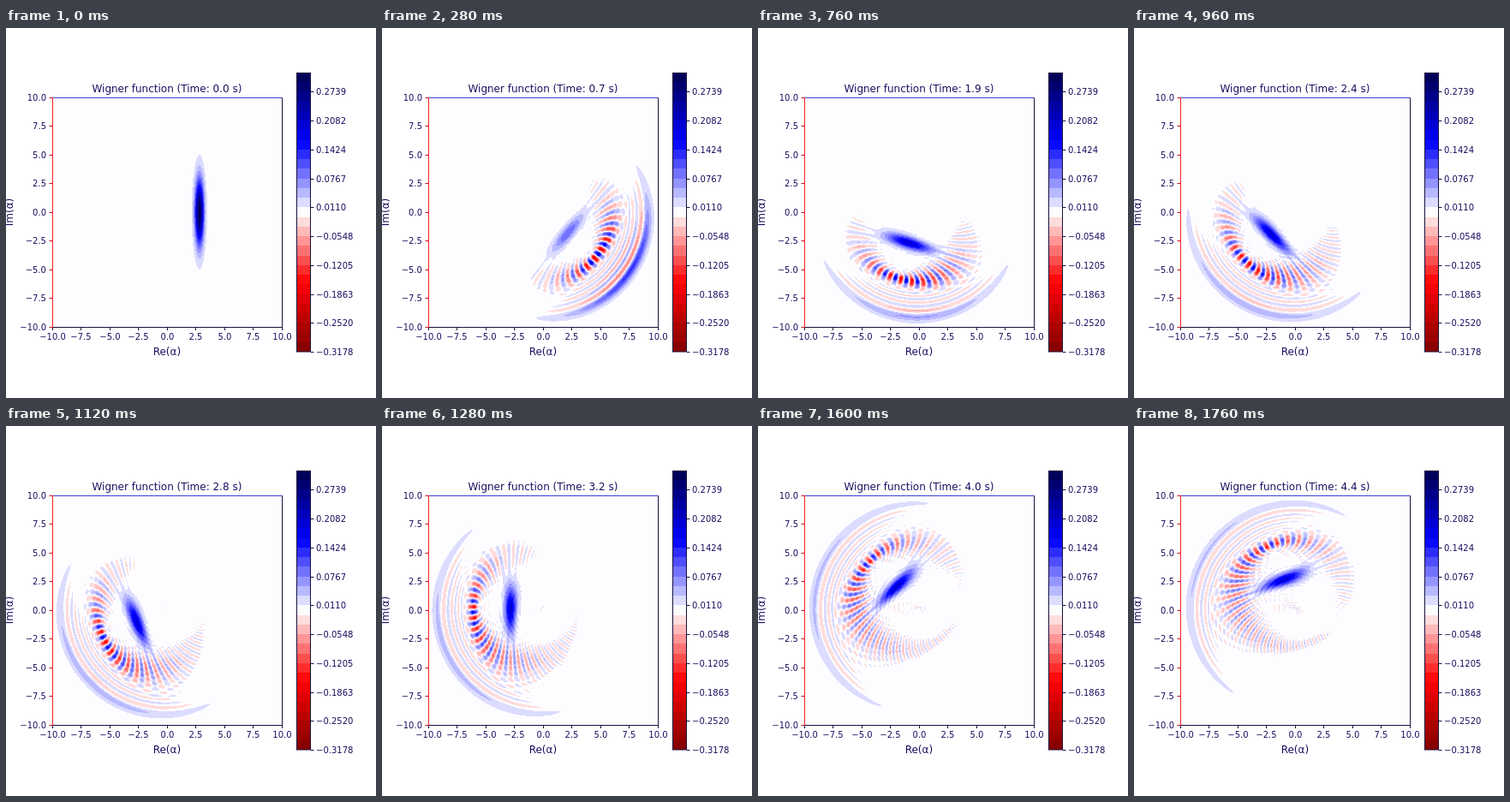
Write an HTML page with a canvas that moves like this. It is 432 px wide and 432 px high and loops after 1800 ms.

```html
<!DOCTYPE html>
<html lang="en">
<head>
<meta charset="utf-8">
<title>Wigner function</title>
<style>
  html, body { margin: 0; width: 100%; height: 100%; overflow: hidden; background: #fff; }
  canvas { position: absolute; left: 54px; top: 81px; }
  svg { position: absolute; left: 0; top: 0; }
  text { font: 10px "DejaVu Sans", sans-serif; fill: #1a1060; }
  .big { font-size: 12px; text-anchor: middle; }
  .end { text-anchor: end; }
  .mid { text-anchor: middle; }
  line { stroke: #181040; }
</style>
</head>
<body>
<canvas id="field" width="268" height="268"></canvas>
<svg id="chart" width="432" height="432" viewBox="0 0 432 432">
  <text id="title" class="big" x="187.9" y="75"></text>
  <text class="big" x="187.9" y="381.5">Re(α)</text>
  <text class="big" transform="translate(8 215) rotate(-90)">Im(α)</text>
</svg>
<script>
const FRAME_MS = 40, FRAMES = 45;
const SIDE = 267.9, LEFT = 54, TOP = 81;
const BINS = 29, PEAK = 0.31776;
const LEVELS = 60;             // Fock states kept
const H = 0.125;               // grid step in phase space
const M = 201, GRID = 161, PAD = 20;

const chart = document.getElementById('chart');
const title = document.getElementById('title');
const ctx = document.getElementById('field').getContext('2d');

// Colours: dark red - red - white - blue - dark blue
function binColor(i) {
  if (i === (BINS - 1) / 2) return [253, 253, 255];
  const v = 1 - (i + 0.5) / BINS;
  let c;
  if (v < 0.25) c = [0, 0, 0.3 + 2.8 * v];
  else if (v < 0.5) c = [4 * v - 1, 4 * v - 1, 1];
  else if (v < 0.75) c = [1, 3 - 4 * v, 3 - 4 * v];
  else c = [1 - 2 * (v - 0.75), 0, 0];
  return c.map(q => Math.round(q * 255));
}
const colors = Array.from({ length: BINS }, (_, i) => binColor(i));
const packed = Uint32Array.from(colors, ([r, g, b]) => (255 << 24 | b << 16 | g << 8 | r) >>> 0);

// Axes and colour bar
function add(tag, attrs, label) {
  const el = document.createElementNS('http://www.w3.org/2000/svg', tag);
  for (const k in attrs) el.setAttribute(k, attrs[k]);
  if (label) el.textContent = label;
  chart.appendChild(el);
}
const line = (x1, y1, x2, y2, stroke = '#181040') =>
  add('line', { x1, y1, x2, y2, style: `stroke:${stroke}` });
const signed = (v, digits) => v.toFixed(digits).replace('-', '−');

function drawChart() {
  const right = 322.5, bottom = 349.5;
  for (let i = 0; i < 9; i++) {
    const v = -10 + 2.5 * i;
    const x = Math.round(LEFT + i * SIDE / 8) + 0.5;
    const y = Math.round(TOP + SIDE - i * SIDE / 8) + 0.5;
    line(x, 350, x, 353);
    line(50.5, y, 54, y, '#d01020');
    add('text', { x, y: 363.5, class: 'mid' }, signed(v, 1));
    add('text', { x: 47, y: y + 3.4, class: 'end' }, signed(v, 1));
  }
  line(LEFT, bottom, 323, bottom);
  line(right, TOP, right, 350);
  line(LEFT, 81.5, 323, 81.5, '#4040d8');
  line(54.5, TOP, 54.5, 350, '#f02020');

  const barX = 339, barW = 16, barTop = 52, barH = 326, step = barH / BINS;
  colors.forEach((c, i) => add('rect', {
    x: barX, y: barTop + barH - (i + 1) * step, width: barW, height: step,
    fill: `rgb(${c})`, 'shape-rendering': 'crispEdges'
  }));
  add('rect', { x: 339.5, y: 52.5, width: barW, height: barH - 0.5, fill: 'none', stroke: '#181040' });
  for (let i = 0; i < BINS; i += 3) {
    const y = barTop + barH - i * step;
    line(356, Math.round(y) + 0.5, 359.5, Math.round(y) + 0.5);
    add('text', { x: 362, y: y + 4 }, signed(-PEAK + i * 2 * PEAK / BINS, 4));
  }
}

// Oscillator eigenfunctions on the position grid
const basis = Array.from({ length: LEVELS }, () => new Float64Array(M));
for (let m = 0; m < M; m++) {
  const x = (m - 100) * H;
  basis[0][m] = Math.PI ** -0.25 * Math.exp(-x * x / 2);
  basis[1][m] = Math.SQRT2 * x * basis[0][m];
  for (let n = 2; n < LEVELS; n++)
    basis[n][m] = Math.sqrt(2 / n) * x * basis[n - 1][m] - Math.sqrt((n - 1) / n) * basis[n - 2][m];
}

// Squeezed coherent state with alpha = 2, as Fock amplitudes
const X0 = 2 * Math.SQRT2;
function squeezed(r) {
  const s = Math.exp(2 * r);
  return basis.map(phi => phi.reduce((sum, f, m) => {
    const d = (m - 100) * H - X0;
    return sum + H * f * (s / Math.PI) ** 0.25 * Math.exp(-s * d * d / 2);
  }, 0));
}

const ease = u => { u = Math.min(1, Math.max(0, u)); return u * u * (3 - 2 * u); };

// State at time t: a core that relaxes its squeezing, plus an arc that has moved outward
function state(t) {
  const share = 0.7 * ease(t / 0.7) - 0.32 * ease((t - 0.7) / 0.5);
  const radius = X0 + 6.5 * ease(t / 0.65);
  const n0 = radius * radius / 2, spread = 1.1;
  const core = squeezed(1 - 0.3 * ease(t / 0.7));
  const arc = core.map((_, n) => Math.exp(-((n - n0) ** 2) / (4 * spread * spread)));
  const a = Math.sqrt(1 - share), b = Math.sqrt(share) / Math.hypot(...arc);
  const re = new Float64Array(M), im = new Float64Array(M);
  let total = 0;
  const parts = core.map((c, n) => {
    const phase = (1.01 * n - 0.0019 * n * n) * t;
    const chirp = 0.09 * (n - n0) ** 2 * t;
    const part = [
      a * c * Math.cos(phase) + b * arc[n] * Math.cos(phase + chirp),
      -a * c * Math.sin(phase) - b * arc[n] * Math.sin(phase + chirp)
    ];
    total += part[0] ** 2 + part[1] ** 2;
    return part;
  });
  const norm = 1 / Math.sqrt(total);
  parts.forEach(([cr, ci], n) => {
    for (let m = 0; m < M; m++) {
      re[m] += norm * cr * basis[n][m];
      im[m] += norm * ci * basis[n][m];
    }
  });
  return [re, im];
}

// Fourier factors exp(2 i p y)
const waves = Array.from({ length: 101 }, (_, k) => {
  const cos = new Float64Array(GRID), sin = new Float64Array(GRID);
  for (let j = 0; j < GRID; j++) {
    const q = 2 * (j - 80) * H * k * H;
    cos[j] = Math.cos(q);
    sin[j] = Math.sin(q);
  }
  return { cos, sin };
});

function wigner([re, im]) {
  const w = new Float64Array(GRID * GRID);
  for (let i = 0; i < GRID; i++) {
    const m = i + PAD, reach = Math.min(m, M - 1 - m);
    const row = w.subarray(i * GRID, (i + 1) * GRID);
    for (let k = 0; k <= reach; k++) {
      const u = m + k, v = m - k, scale = (k ? 2 : 1) * H / Math.PI;
      const fr = scale * (re[u] * re[v] + im[u] * im[v]);
      const fi = scale * (re[u] * im[v] - im[u] * re[v]);
      if (Math.abs(fr) + Math.abs(fi) < 1e-7) continue;
      const { cos, sin } = waves[k];
      for (let j = 0; j < GRID; j++) row[j] += fr * cos[j] - fi * sin[j];
    }
  }
  return w;
}

function render(t) {
  const w = wigner(state(t));
  const image = ctx.createImageData(268, 268);
  const out = new Uint32Array(image.data.buffer);
  const toGrid = px => Math.min(159.999, (px + 0.5) / SIDE * 160);
  for (let py = 0; py < 268; py++) {
    const gy = 160 - toGrid(py), j = Math.min(159, Math.floor(gy)), fy = gy - j;
    for (let px = 0; px < 268; px++) {
      const gx = toGrid(px), i = Math.floor(gx), fx = gx - i, o = i * GRID + j;
      const value = (1 - fx) * ((1 - fy) * w[o] + fy * w[o + 1])
        + fx * ((1 - fy) * w[o + GRID] + fy * w[o + GRID + 1]);
      const bin = Math.floor((value + PEAK) / (2 * PEAK) * BINS);
      out[py * 268 + px] = packed[Math.max(0, Math.min(BINS - 1, bin))];
    }
  }
  return image;
}

const cache = [];
let shown = -1;
function show(index) {
  if (index === shown) return;
  shown = index;
  cache[index] = cache[index] || render(index / 10);
  ctx.putImageData(cache[index], 0, 0);
  title.textContent = `Wigner function (Time: ${(index / 10).toFixed(1)} s)`;
}

drawChart();
show(0);
const start = performance.now();
function tick() {
  show(Math.floor((performance.now() - start) / FRAME_MS) % FRAMES);
  requestAnimationFrame(tick);
}
requestAnimationFrame(tick);
</script>
</body>
</html>
```
